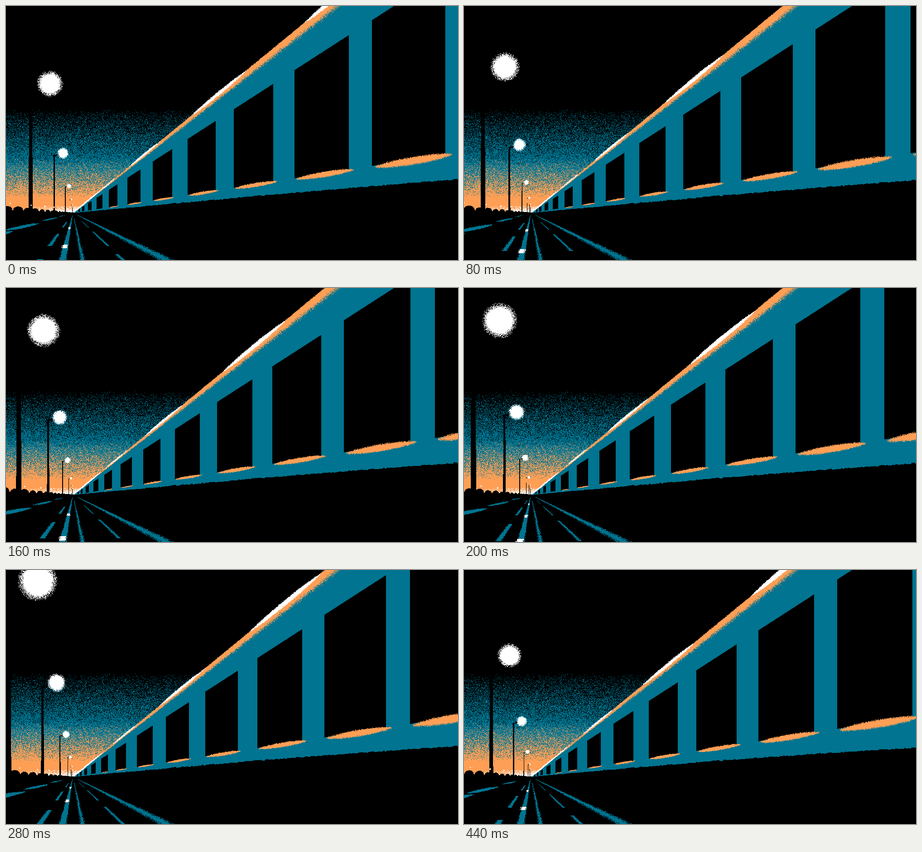
Recreate the animation shown at these times as an HTML page with a canvas. Size 998 by 561 pixels, loop 0.48 s.

```html
<!DOCTYPE html>
<html lang="en">
<head>
<meta charset="utf-8">
<title>Night train</title>
<style>
html, body { margin: 0; width: 100%; height: 100%; overflow: hidden; background: #000; }
canvas { display: block; width: 100vw; height: 100vh; image-rendering: pixelated; }
</style>
</head>
<body>
<canvas id="stage" width="998" height="561"></canvas>
<script>
const W = 998, H = 561, VX = 148, VY = 457;
const LOOP = 480, STEP = 40;
const ctx = document.getElementById('stage').getContext('2d');
const image = ctx.createImageData(W, H);
const px = new Uint32Array(image.data.buffer);
const rgb = (r, g, b) => (255 << 24 | b << 16 | g << 8 | r) >>> 0;
const BLACK = rgb(0, 0, 0), TEAL = rgb(0, 116, 144), ORANGE = rgb(255, 159, 86), WHITE = rgb(255, 255, 255);
const clamp = v => Math.max(0, Math.min(1, v));

// Fixed grain
const grain = new Float32Array(W * H);
let seed = 7;
for (let i = 0; i < grain.length; i++) {
  seed = (seed + 0x6D2B79F5) | 0;
  let h = Math.imul(seed ^ (seed >>> 15), 1 | seed);
  h = (h + Math.imul(h ^ (h >>> 7), 61 | h)) ^ h;
  grain[i] = ((h ^ (h >>> 14)) >>> 0) / 4294967296;
}

// Distances from the vanishing point, one entry per loop
const windows = [1180, 879, 660, 489, 355, 253, 176, 120, 79, 52, 33, 20, 12, 7];
const lamps = [1.3, 3, 7, 17, 41.5, 93.5, 192, 380];
const shines = [10, 23, 54, 122, 262, 512, 950];
const leftDashes = [9, 20, 46, 102, 220];
const patches = [7, 15, 33.5, 74, 160];
const kerbs = [16, 34, 75, 132, 240];

// Smooth interpolation of the logarithms
function at(list, u) {
  const n = list.length - 1;
  const i = Math.max(0, Math.min(n - 1, Math.floor(u))), f = u - i;
  const g = k => k < 0 ? 2 * Math.log(list[0]) - Math.log(list[1])
    : k > n ? 2 * Math.log(list[n]) - Math.log(list[n - 1]) : Math.log(list[k]);
  const a = g(i - 1), b = g(i), c = g(i + 1), d = g(i + 2);
  return Math.exp(b + f / 2 * (c - a + f * (2 * a - 5 * b + 4 * c - d + f * (3 * (b - c) + d - a))));
}

function paint(x0, y0, x1, y1, color, test) {
  x0 = Math.max(0, Math.floor(x0)); x1 = Math.min(W, Math.ceil(x1));
  y0 = Math.max(0, Math.floor(y0)); y1 = Math.min(H, Math.ceil(y1));
  for (let y = y0; y < y1; y++)
    for (let x = x0, i = y * W + x0; x < x1; x++, i++)
      if (test(x + .5, y + .5, grain[i])) px[i] = color;
}

function blob(cx, cy, r, soft, color) {
  const R = r + soft;
  paint(cx - R, cy - R, cx + R, cy + R, color,
    (x, y, n) => Math.hypot(x - cx, y - cy) < r + soft * (n + n - 1));
}

// Tapered stroke; coordinates relative to the vanishing point
function lens(ax, ay, bx, by, h, power, soft, color) {
  const mx = VX + (ax + bx) / 2, my = VY + (ay + by) / 2;
  const half = Math.hypot(bx - ax, by - ay) / 2;
  const ux = (bx - ax) / 2 / half, uy = (by - ay) / 2 / half;
  const pad = h + 2;
  paint(VX + Math.min(ax, bx) - pad, VY + Math.min(ay, by) - pad,
    VX + Math.max(ax, bx) + pad, VY + Math.max(ay, by) + pad, color, (x, y, n) => {
      const a = ((x - mx) * ux + (y - my) * uy) / half;
      if (a * a >= 1) return false;
      const p = Math.abs((y - my) * ux - (x - mx) * uy);
      return p < h * Math.pow(1 - a * a, power) + soft * (n - .5);
    });
}

// Road marking between two directions
function ray(from, to, a, b, soft, color) {
  to = Math.min(to, H - VY);
  paint(VX + Math.min(a * from, a * to) - 8, VY + from,
    VX + Math.max(b * from, b * to) + 8, VY + to, color, (x, y, n) => {
      const s = (x - VX) / (y - VY), e = soft * (n + n - 1);
      return s > a - e && s < b + e;
    });
}

function drawSky() {
  for (let y = 228; y < 460; y++) {
    const teal = Math.pow(clamp((y - 228) / 130), .95);
    const orange = Math.pow(clamp((y - 335) / 88), 1.2);
    for (let x = 0; x < 420; x++) {
      const i = y * W + x, n = grain[i], m = grain[(i * 7 + 991) % grain.length];
      const white = clamp((y - 440) / 13) * clamp(1.1 - Math.abs(x - VX) / 110);
      px[i] = grain[(i * 3 + 457) % grain.length] < white ? WHITE
        : m < orange ? ORANGE : n < teal ? TEAL : BLACK;
    }
  }
}

function drawBase() {
  px.fill(BLACK);
  drawSky();
  paint(VX, 0, W, VY, TEAL, (x, y, n) => VY - y < .823 * (x - VX) + 2 * (n - .5));
  paint(VX, 0, 770, VY, ORANGE, (x, y, n) => {
    const d = x - VX, up = VY - y;
    const fade = (n + grain[Math.floor(n * 90000)] - 1) * .017 * d;
    return up < .823 * d + 2 * (n - .5) && up > .782 * d + fade;
  });
  lens(0, 0, 62, -51, 1.6, .5, 1, WHITE);
  paint(VX, VY, W, H, BLACK, () => true);
  paint(0, VY, VX, H, BLACK, () => true);
  ray(5, 104, 1.86, 2.12, .08, TEAL);
  ray(12, 104, .168, .243, .03, TEAL);
  ray(3, 104, -.295, -.145, .02, TEAL);
}

function drawLamps(t) {
  for (let k = 0; k < 7; k++) {
    const e = at(lamps, k + t), x = VX - e, top = 448 - 2.955 * e, lx = VX + .5 - .548 * e;
    const arm = top + .12 * e, wide = Math.max(.5, .049 * e);
    paint(x - wide - 1, arm, x + wide + 1, 457, BLACK, (qx, qy) =>
      Math.abs(qx - x) < wide * (.72 + .28 * (qy - arm) / (457 - arm)));
    paint(x - wide * .8, top - 2, lx, arm + .06 * e + 1, BLACK, (qx, qy) =>
      Math.abs(qy - arm + (qx - x) * .16) < Math.max(.5, .03 * e));
    blob(lx, top, Math.max(.265 * e, 1.2), .05 * e, WHITE);
  }
}

function drawHorizon(t) {
  for (let k = 0; k < 4; k++) {
    const d = 93 * Math.exp(.4 * (t + 1 - k));
    blob(VX - d, 448 - .09 * d, 1.4, .5, WHITE);
  }
  paint(0, 440, VX + 2, VY + 1, BLACK, (x, y) => y > 456 - .04 * (VX - x));
  for (let k = 6; k < 27; k++) {
    const d = at(lamps, k / 4 + .1 + t), cx = VX - d;
    if (d > 180) break;
    const w = d * (.075 + .012 * (k % 2)), h = d * (.058 + .012 * (k % 2)), base = 456 - .04 * d;
    paint(cx - w, base - h, cx + w, base + 3, BLACK, (x, y, n) => {
      const a = (x - cx) / w, b = (y - base) / h;
      return y > base || a * a + b * b < 1 + .2 * (n - .5);
    });
  }
}

function drawRoad(t) {
  for (let k = 0; k < 4; k++) {
    const p = at(leftDashes, k + t);
    if (p > 12) {
      ray(p, p * 1.58, -.77, -.645, .02, TEAL);
      ray(p * .9, p * 1.58, 1.025, 1.1, .02, TEAL);
    }
    const c = at(patches, k + t);
    if (c > 20) ray(c * .955, c * 1.05, -.315, -.165, .03, WHITE);
    const f = at(kerbs, k + t);
    lens(-f, .31 * f, -2 * f, .51 * f, .042 * f, .7, 1.5, TEAL);
  }
}

function drawTrain(t) {
  // underside
  for (let x = VX; x < W; x++) {
    const d = x - VX;
    const y0 = VY - .096 * d + 9.5e-6 * d * d + 11 * t * (d / 850) ** 2;
    const wobble = 2.4 * (grain[x >> 2] - .5) * clamp(d / 250);
    for (let y = Math.round(y0 + wobble); y < VY; y++) px[y * W + x] = BLACK;
  }
  for (let k = 0; k < 13; k++) {
    const d = at(windows, k + t);
    const left = VX + d, right = VX + 1.245 * d;
    paint(left, VY - .645 * 1.245 * d, right, VY - .157 * d, BLACK, (x, y) => {
      const q = x - VX, up = VY - y;
      return x >= left && x < right && up < .645 * q && up > .157 * q;
    });
  }
  for (let k = 0; k < 9; k++) {
    const d = at(windows, k + t);
    lens(1.008 * d, -.153 * d, 1.268 * d, -.196 * d, .0122 * d, .65, .006 * d, ORANGE);
  }
  for (let k = 0; k < 6; k++) {
    const s = at(shines, k + t), e = 192 * Math.pow(s / 122, .9);
    lens(s, -.821 * s, e, -.821 * e, Math.min(6, .0095 * (s + e) / 2 + .6), .75, 2, WHITE);
  }
}

drawBase();
const base = px.slice();
let last = -1;

function render(step) {
  const t = step * STEP / LOOP;
  px.set(base);
  drawLamps(t);
  drawHorizon(t);
  drawRoad(t);
  drawTrain(t);
  ctx.putImageData(image, 0, 0);
}

const start = performance.now();
function tick() {
  const step = Math.floor((performance.now() - start) % LOOP / STEP);
  if (step !== last) render(last = step);
  requestAnimationFrame(tick);
}
tick();
</script>
</body>
</html>
```
